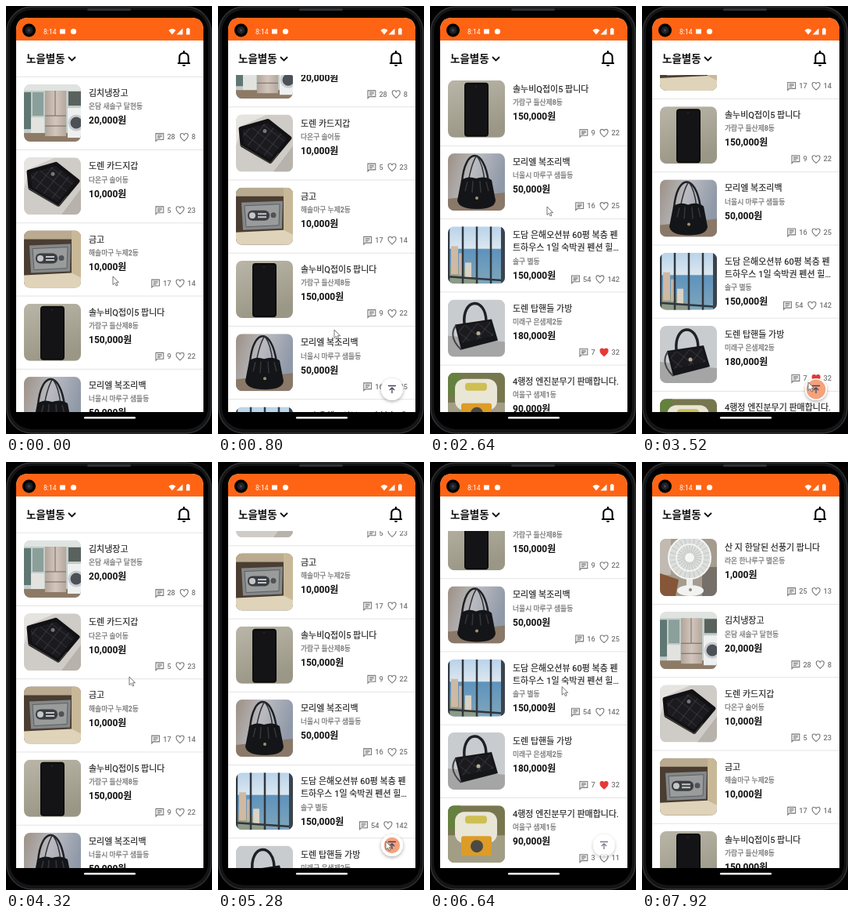
These frames come from a looping animation (264x546 px, 8000 ms). An HTML page:

```html
<!DOCTYPE html>
<html lang="ko">
<head>
<meta charset="utf-8">
<style>
html, body { margin: 0; width: 100%; height: 100%; overflow: hidden; background: #000; }
svg { display: block; width: 264px; height: 546px; font-family: Roboto, "Noto Sans CJK KR", "Noto Sans CJK", sans-serif; }
.title { font-size: 11px; fill: #1c1c1c; stroke: #1c1c1c; stroke-width: .15; }
.place { font-size: 8.8px; font-weight: 500; fill: #777; stroke: #777; stroke-width: .25; }
.price { font-size: 12px; font-weight: 700; fill: #111; }
.count { font-size: 9.2px; font-weight: 500; fill: #777; }
.line { fill: none; stroke: #777; stroke-width: 1.1; }
</style>
</head>
<body>
<svg viewBox="0 0 264 546">
  <defs>
    <clipPath id="screen"><path d="M13 518V31Q13 15 29 15H237Q253 15 253 31V518Z"/></clipPath>
    <clipPath id="feed"><rect x="13" y="88" width="240" height="430"/></clipPath>
    <clipPath id="thumb"><rect width="73" height="73" rx="8"/></clipPath>
    <pattern id="quilt" width="12" height="12" patternUnits="userSpaceOnUse" patternTransform="rotate(38)">
      <rect width="12" height="12" fill="#1b1b1f"/><path d="M0 0H12M0 0V12" stroke="#45454b" stroke-width="1.2"/>
    </pattern>
    <linearGradient id="sky" x2="0" y2="1">
      <stop stop-color="#b9d3ea"/><stop offset=".38" stop-color="#dbe7ef"/>
      <stop offset=".4" stop-color="#5e93bd"/><stop offset="1" stop-color="#7fa6bb"/>
    </linearGradient>
    <linearGradient id="steel"><stop stop-color="#b3a49a"/><stop offset=".5" stop-color="#d2c6bc"/><stop offset="1" stop-color="#b5a79c"/></linearGradient>
    <linearGradient id="desk" x2=".3" y2="1"><stop stop-color="#b9b6a8"/><stop offset="1" stop-color="#9b9786"/></linearGradient>
    <linearGradient id="wall" x2="1" y2=".3"><stop stop-color="#9c9085"/><stop offset=".5" stop-color="#b9bac0"/><stop offset="1" stop-color="#8f99a8"/></linearGradient>
    <filter id="shadow" x="-50%" y="-50%" width="200%" height="200%">
      <feDropShadow dx="0" dy="1.5" stdDeviation="2" flood-opacity=".35"/>
    </filter>
  </defs>

  <rect x="1" y="1" width="262" height="544" rx="32" fill="#141516" stroke="#333437" stroke-width="1.4"/>
  <rect x="5" y="5" width="254" height="535" rx="28"/>
  <rect x="104" y="3" width="56" height="3" rx="1.5" fill="#303133"/>

  <g clip-path="url(#screen)">
    <rect x="13" y="15" width="240" height="503" fill="#fff"/>
    <g clip-path="url(#feed)"><g id="list"></g></g>
    <rect x="13" y="15" width="240" height="29" fill="#ff6414"/>
    <g fill="#fff">
      <text x="48" y="35.500" font-size="8.600">8:14</text>
      <rect x="69" y="29.500" width="7" height="6"/>
      <circle cx="86.500" cy="32.500" r="3.600"/>
      <path d="M208.500 31Q213 27 217.500 31L213 36.500Z"/>
      <path d="M226.500 28.500V36.500H218.500Z"/>
      <path d="M231 29H232.200V28H234.400V29H235.600V36.500H231Z"/>
    </g>
    <text x="26" y="72" font-size="13.500" font-weight="700" fill="#111">노을별동</text>
    <path d="M80 65L84.500 69.500L89 65" fill="none" stroke="#111" stroke-width="1.800"/>
    <path d="M220 73H236M222.300 73V65.500Q222.300 60 228 60T233.700 65.500V73M228 57V60" fill="none" stroke="#000" stroke-width="2"/>
    <path d="M226 75H230Q230 77 228 77T226 75Z"/>
    <g id="fab">
      <circle cx="223" cy="489" r="14" fill="#fff" filter="url(#shadow)"/>
      <circle id="ripple" cx="223" cy="489" fill="#f4a27c"/>
      <path d="M218 484.500H228M223 494V487M219.800 490L223 486.800L226.200 490" fill="none" stroke="#45425c" stroke-width="1.300"/>
    </g>
  </g>
  <circle cx="29.500" cy="31" r="8.500"/><circle cx="29.500" cy="31" r="5" fill="#1d2024"/><circle cx="29.500" cy="31" r="1.800" fill="#3d444f"/>
  <rect x="100" y="524" width="66" height="2.400" rx="1.200" fill="#fff"/>
  <path id="cursor" d="M0 0V10.500L2.500 8.300L4.300 12L6 11.200L4.300 7.700H7.500Z" fill="#fff" stroke="#555" stroke-width=".8"/>
</svg>

<script>
const $ = id => document.getElementById(id);
const rect = (x, y, w, h, fill, rx = 0) => `<rect x="${x}" y="${y}" width="${w}" height="${h}" rx="${rx}" fill="${fill}"/>`;
const path = (d, fill, stroke = 'none', w = 1) => `<path d="${d}" fill="${fill}" stroke="${stroke}" stroke-width="${w}" stroke-linejoin="round"/>`;
const disc = (x, y, r, fill, stroke = 'none', w = 1) => `<circle cx="${x}" cy="${y}" r="${r}" fill="${fill}" stroke="${stroke}" stroke-width="${w}"/>`;
const back = fill => rect(0, 0, 73, 73, fill);
const text = (cls, x, y, s) => `<text class="${cls}" x="${x}" y="${y}">${s}</text>`;

function fan() {
  let blades = '';
  for (let a = 0; a < 360; a += 15)
    blades += `<path d="M38 24L38 -2" stroke="#b9bbb9" stroke-width=".7" transform="rotate(${a} 38 24)"/>`;
  return back('#a59c90') + rect(0, 0, 14, 46, '#c0bab0') + path('M0 44L24 52L20 73H0Z', '#855637') +
    rect(54, 36, 19, 37, '#77706a') + rect(34, 44, 8, 22, '#eceeec') +
    `<ellipse cx="39" cy="66" rx="17" ry="7" fill="#f2f3f1"/>` +
    disc(38, 24, 27, '#dcdedb', '#f6f6f4', 2) + blades +
    disc(38, 24, 17, 'none', '#f3f3f1', 2) + disc(38, 24, 6, '#f7f7f5') + disc(39, 65, 2, '#888');
}

const fridge = () => back('#c3ccca') + rect(0, 0, 73, 8, '#dfe4e0') + rect(0, 10, 9, 47, '#5f7773') +
  rect(11, 10, 14, 30, '#8ba09b') + rect(9, 42, 17, 22, '#e2e3df') + rect(0, 62, 73, 11, '#8d7a66') +
  rect(27, 8, 27, 58, 'url(#steel)') + path('M40 8V40M27 40H54M27 53H54', 'none', '#75675f') +
  rect(56, 30, 17, 38, '#eef0f0') + disc(67, 49, 9, '#4b5157', '#c9cdd0', 3) + rect(57, 9, 16, 18, '#59625d');

const wallet = () => back('#cfccc7') + path('M0 0H40L8 14L0 40Z', '#e6e4e0') + path('M48 73L73 40V73Z', '#b7b2ab') +
  path('M6 18L41 8L69 30L44 60L8 39Z', 'url(#quilt)', '#121215', 5) +
  path('M6 39L44 62L55 49', 'none', '#57534b') + disc(37, 21, 2.5, '#77777b');

const safe = () => back('#4a3d31') + rect(0, 0, 73, 11, '#b9aa90') + rect(61, 0, 12, 73, '#c9b897') +
  path('M0 57L61 54L73 60V73H0Z', '#dfd3ba') + path('M7 19L60 17L59 52L9 54Z', '#85888a') +
  path('M11 23L56 21L55 48L13 50Z', '#9a9c9c', '#5d6062') + rect(15, 29, 28, 13, '#3b3e43', 6) +
  disc(21, 35.5, 4, '#c4c7c8') + path('M28 33.500H39M28 37.500H39', 'none', '#c4c7c8', 2) + disc(48, 35, 3.5, '#4f5357');

const phone = () => back('url(#desk)') + rect(21, 3, 31, 69, '#0b0b0c', 4) + rect(22.5, 5, 28, 65, '#141416', 3) + disc(36, 8, .8, '#34373c');

const bucket = () => back('url(#wall)') + path('M0 58L73 50V73H0Z', '#8a7868') +
  path('M18 36C22 -8 46 -8 52 36', 'none', '#1f2023', 2.5) + path('M26 36Q31 10 37 3Q45 14 47 36', 'none', '#303136', 1.5) +
  path('M17 34Q26 28 36 32Q47 28 56 34L61 60Q60 71 37 71T12 60Z', '#141518') +
  path('M25 36L22 48M32 35L31 50M41 35L42 50M49 36L52 48', 'none', '#35363a', 1.5) + disc(37, 57, 2, '#a29367');

const ocean = () => back('url(#sky)') + path('M0 52Q25 48 40 73H0Z', '#8d9a86') +
  rect(4, 25, 9, 36, '#d0b9a2') + rect(14, 34, 6, 28, '#c3b3a4') + rect(22, 46, 8, 20, '#d9d2c6') +
  path('M1 0V73M19 0V73M37 0V73M55 0V73M0 64L73 69', 'none', '#30373f', 2.5) + rect(68, 0, 5, 73, '#3b434c');

const handbag = () => back('#c9cccf') + path('M0 46L73 54V73H0Z', '#a5a5a5') +
  path('M21 31C18 -2 48 -4 49 27', 'none', '#202127', 3.5) +
  path('M9 32L56 25L64 52L17 64Z', '#15161a') + path('M12 34L54 28L59 46L18 55Z', 'url(#quilt)') +
  path('M17 64Q0 48 10 33', 'none', '#444349', 2) + disc(39, 43, 2.5, '#b7ad96');

const sprayer = () => back('#77774f') + rect(0, 0, 16, 30, '#66803f') + rect(0, 38, 73, 35, '#a29d85') +
  rect(9, 8, 54, 40, '#e9e6d6', 12) + rect(22, 13, 28, 10, '#cdbf52', 4) + rect(17, 39, 39, 25, '#dd9c27', 3) + disc(37, 52, 8, '#494a46');

const items = [
  [fan, '산 지 한달된 선풍기 팝니다', '라온 한나루구 별온동', '1,000', 25, 13],
  [fridge, '김치냉장고', '온담 새솔구 달현동', '20,000', 28, 8],
  [wallet, '도렌 카드지갑', '다온구 솔어동', '10,000', 5, 23],
  [safe, '금고', '해솔마구 누제2동', '10,000', 17, 14],
  [phone, '솔누비Q접이5 팝니다', '가람구 들산제8동', '150,000', 9, 22],
  [bucket, '모리엘 복조리백', '너울시 마루구 샘들동', '50,000', 16, 25],
  [ocean, '도담 은해오션뷰 60평 복층 펜|트하우스 1일 숙박권 펜션 힐…', '솔구 별동', '150,000', 54, 142],
  [handbag, '도렌 탑핸들 가방', '미래구 은샘제2동', '180,000', 7, 32, true],
  [sprayer, '4행정 엔진분무기 판매합니다.', '여울구 샘제1동', '90,000', 3, 11]
];

function row([draw, title, place, price, chats, likes, liked], i) {
  const lines = title.split('|'), dy = 16 * (lines.length - 1);
  const likeX = 243 - 5.2 * `${likes}`.length, heartX = likeX - 15;
  const chatX = heartX - 6 - 5.2 * `${chats}`.length, iconX = chatX - 15;
  const heart = 'M5.500 10C-2 4.500 .5 .5 3 .5Q4.800 .5 5.500 2.200Q6.200 .5 8 .5C10.500 .5 13 4.500 5.500 10Z';
  return `<g transform="translate(0 ${98 + 93.25 * i})">
    <g transform="translate(23 0)" clip-path="url(#thumb)">${draw()}</g>
    ${lines.map((s, n) => text('title', 106, 15 + 16 * n, s)).join('')}
    ${text('place', 106, 31.3 + dy, place)}${text('price', 106, 50.3 + dy, price + '원')}
    ${text('count', chatX, 70.3, chats)}${text('count', likeX, 70.3, likes)}
    <path class="line" transform="translate(${iconX} 62)" d="M.6 .6H10.400V8.400H2.600L.6 10.400ZM2.500 2.700H8.500M2.500 4.500H8.500M2.500 6.300H6.500"/>
    <path class="line" transform="translate(${heartX} 62)" d="${heart}"${liked ? ' style="fill:#e53935;stroke:#e53935"' : ''}/>
    ${rect(13, 83, 240, 1, '#e4e4e4')}</g>`;
}
$('list').innerHTML = items.map(row).join('');

const clamp = x => Math.max(0, Math.min(1, x));
const smooth = u => u * u * (3 - 2 * u);

// Each visit: scroll start, scroll duration, distance, button press
const visits = [[-300, 1080, 146, 1520], [2160, 840, 408, 3440], [4240, 640, 273.5, 5240], [5880, 825, 406, 7040]];

// Pointer stops: time, x, y
const stops = [
  [0, 137, 345], [300, 140, 300], [800, 149, 413], [1400, 217, 487], [1560, 217, 487], [1840, 184, 497],
  [2160, 150, 430], [2700, 150, 250], [3280, 213, 480], [3520, 213, 480], [4200, 158, 340], [4320, 158, 274],
  [4600, 156, 200], [5150, 215, 484], [5300, 215, 484], [5800, 138, 290], [6000, 137, 224], [6400, 137, 150],
  [6950, 216, 485], [7150, 216, 485], [7720, 150, 560], [8000, 150, 560]
];

function frame(now) {
  const t = now % 8000;
  const [start, span, distance, press] = visits.filter(v => v[0] <= t).pop();
  const down = 1 - (1 - clamp((t - start) / span)) ** 3;
  const up = smooth(clamp((t - press) / 320));
  $('list').setAttribute('transform', `translate(0 ${-distance * down * (1 - up)})`);

  const shown = clamp((t - start - 550) / 300) * (1 - clamp((t - press - 320) / 200));
  $('fab').setAttribute('opacity', shown);
  $('ripple').setAttribute('r', t < press ? 0 : 8 + 6.5 * clamp((t - press) / 120));

  const i = stops.findIndex(s => s[0] > t);
  const [a, b] = [stops[i - 1], stops[i]];
  const u = smooth((t - a[0]) / (b[0] - a[0]));
  $('cursor').setAttribute('transform', `translate(${a[1] + (b[1] - a[1]) * u} ${a[2] + (b[2] - a[2]) * u})`);
  $('cursor').setAttribute('opacity', t < 7720 ? 1 : 0);
  requestAnimationFrame(frame);
}
frame(performance.now());
</script>
</body>
</html>
```
